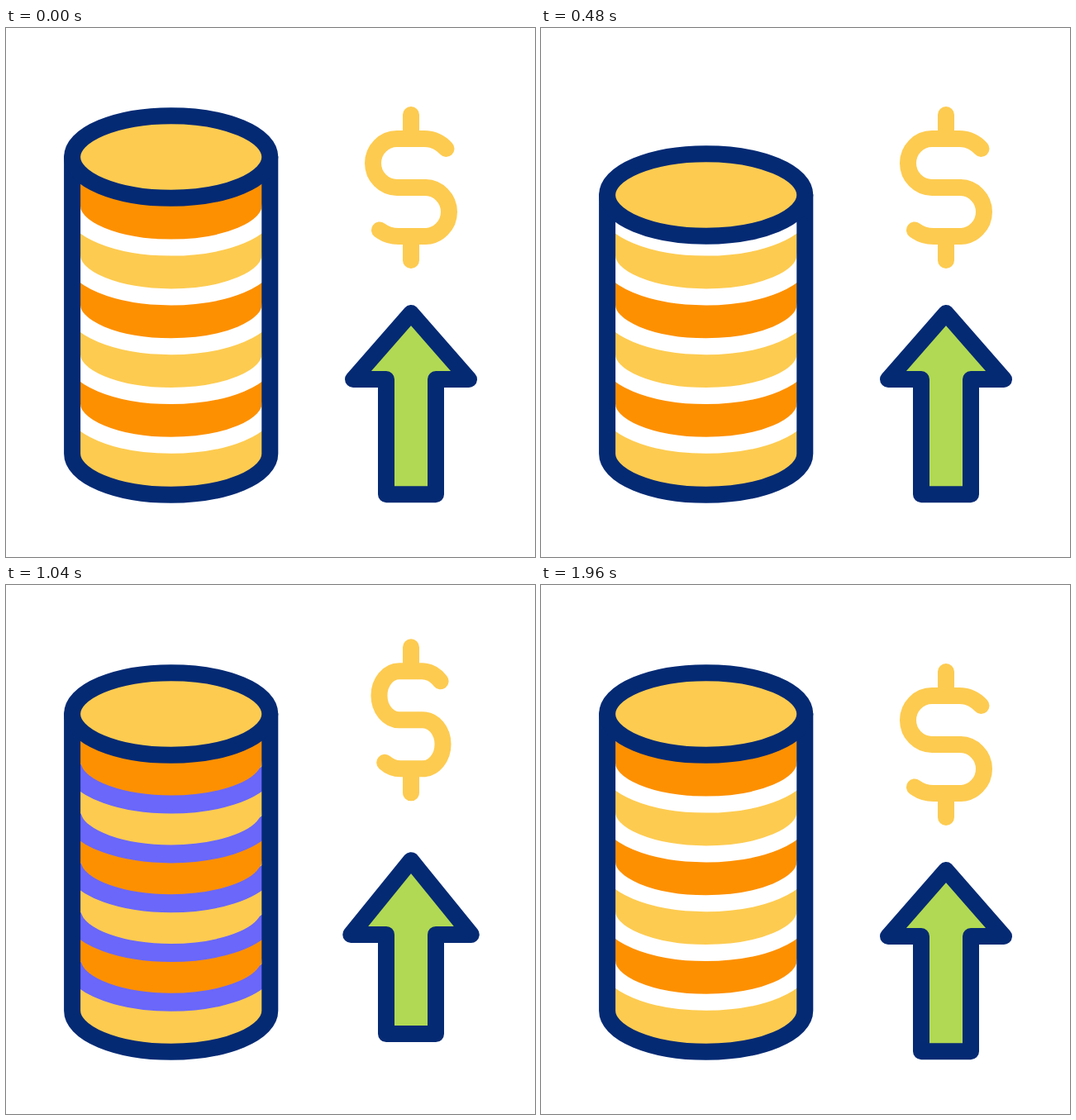
An HTML page for the animation above (2 s loop, 640 by 640 pixels).

```html
<!DOCTYPE html>
<html lang="en">
<head>
<meta charset="utf-8">
<title>Growing coin stack</title>
<style>
  html, body { margin: 0; width: 100%; height: 100%; overflow: hidden; background: #fff; }
  svg { display: block; width: 100vw; height: 100vh; }
  .line { fill: none; stroke-width: 20; stroke-linecap: round; stroke-linejoin: round; }
  .navy { stroke: #042a74; }
  .gold { stroke: #fdcb50; }
  .white { stroke: #fff; }
  .shine { stroke: #6a67fa; stroke-width: 22; }
</style>
</head>
<body>
<svg viewBox="0 0 640 640">
  <clipPath id="bodyClip"><path id="clipShape"/></clipPath>
  <g clip-path="url(#bodyClip)">
    <rect x="70" width="260" height="640" fill="#fdcb50"/>
    <g id="bands"></g>
  </g>
  <path id="body" class="line navy"/>
  <ellipse id="lid" class="line navy" cx="199.7" rx="119.6" ry="49.8" style="fill:#fdcb50"/>
  <path id="dollar" class="line gold"/>
  <path id="arrow" class="line navy" style="fill:#b1d953"/>
</svg>
<script>
const LOOP = 2000, LEFT = 80.1, RIGHT = 319.3, TOP = 156, BOTTOM = 515, STEP = 59.8;
const $ = id => document.getElementById(id);
const set = (el, attrs) => { for (const k in attrs) el.setAttribute(k, attrs[k]); };

// Eased value at time t through [time, value] keys
function track(t, ...keys) {
  if (t <= keys[0][0]) return keys[0][1];
  for (let i = 1; i < keys.length; i++) {
    const [t0, a] = keys[i - 1], [t1, b] = keys[i];
    if (t < t1) {
      const u = (t - t0) / (t1 - t0);
      return a + (b - a) * u * u * (3 - 2 * u);
    }
  }
  return keys[keys.length - 1][1];
}

const arc = y => `${LEFT} ${y}A119.6 49.8 0 0 0 ${RIGHT} ${y}`;

function add(className, attrs) {
  const el = document.createElementNS('http://www.w3.org/2000/svg', 'path');
  el.setAttribute('class', className);
  set(el, attrs);
  return $('bands').appendChild(el);
}

const shines = [];
for (let i = 5; i >= 1; i--) {
  const y = TOP + i * STEP;
  add('', { d: `M${LEFT} 0L${arc(y)}V0Z`, fill: i % 2 ? '#fd9000' : '#fdcb50' });
  add('line white', { d: 'M' + arc(y) });
  shines.push(add('line shine', { d: 'M' + arc(y), pathLength: 1 }));
}

function drawStack(t) {
  const top = TOP + track(t, [0, 0], [280, -55], [480, 46], [660, 0]);
  const bottom = BOTTOM + track(t, [40, 0], [320, -68], [460, 0]);
  const shift = track(t, [0, 0], [280, -45], [440, 0]);
  const d = `M${LEFT} ${top}L${arc(bottom)}V${top}`;
  set($('clipShape'), { d });
  set($('body'), { d });
  set($('lid'), { cy: top });
  set($('bands'), { transform: `translate(0 ${shift})` });

  const end = track(t, [730, 0], [1090, 1]);
  const start = track(t, [1006, 0], [1366, 1]);
  for (const shine of shines) {
    shine.style.display = end > start ? '' : 'none';
    set(shine, { 'stroke-dasharray': `${end - start} 3`, 'stroke-dashoffset': -start });
  }
}

function drawArrow(t) {
  const move = (up, down) => track(t, [560, 0], [920, up], [1215, down], [1560, -6.3], [1840, 0]);
  const tip = 345 + move(-39, 35);
  const wing = 425 + move(-23, 34);
  const base = 564.3 + move(-44.5, 19);
  const half = 70 + track(t, [920, 0], [1215, 7.5], [1480, 0]);
  set($('arrow'), {
    d: `M490 ${tip}L${490 + half} ${wing}H520V${base}H460V${wing}H${490 - half}Z`
  });
}

function drawDollar(t) {
  const dy = track(t, [880, 0], [1162, -49], [1412, 35], [1840, 0]);
  const turn = Math.min(1, Math.max(0, (t - 957) / 913));
  const flip = Math.cos(turn * 2 * Math.PI);
  const p = (x, y) => `${490 + x * flip} ${y + dy} `;
  const curve = (...pts) => 'C' + pts.map(q => p(...q)).join('');
  set($('dollar'), {
    d: 'M' + p(42.5, 146) +
      curve([35, 138], [26, 134], [16, 134]) + 'L' + p(-17, 134) +
      curve([-33, 134], [-46, 147.2], [-46, 163.5]) +
      curve([-46, 179.8], [-33, 193], [-17, 193]) + 'L' + p(17, 193) +
      curve([33, 193], [46, 206.2], [46, 222.5]) +
      curve([46, 238.8], [33, 252], [17, 252]) + 'L' + p(-15, 252) +
      curve([-24, 252], [-32, 249], [-38, 244.5]) +
      'M' + p(0, 105) + 'L' + p(0, 134) + 'M' + p(0, 252) + 'L' + p(0, 281)
  });
}

function render(t) {
  drawStack(t);
  drawArrow(t);
  drawDollar(t);
}

const begin = performance.now();
function frame() {
  render((performance.now() - begin) % LOOP);
  requestAnimationFrame(frame);
}
frame();
</script>
</body>
</html>
```
